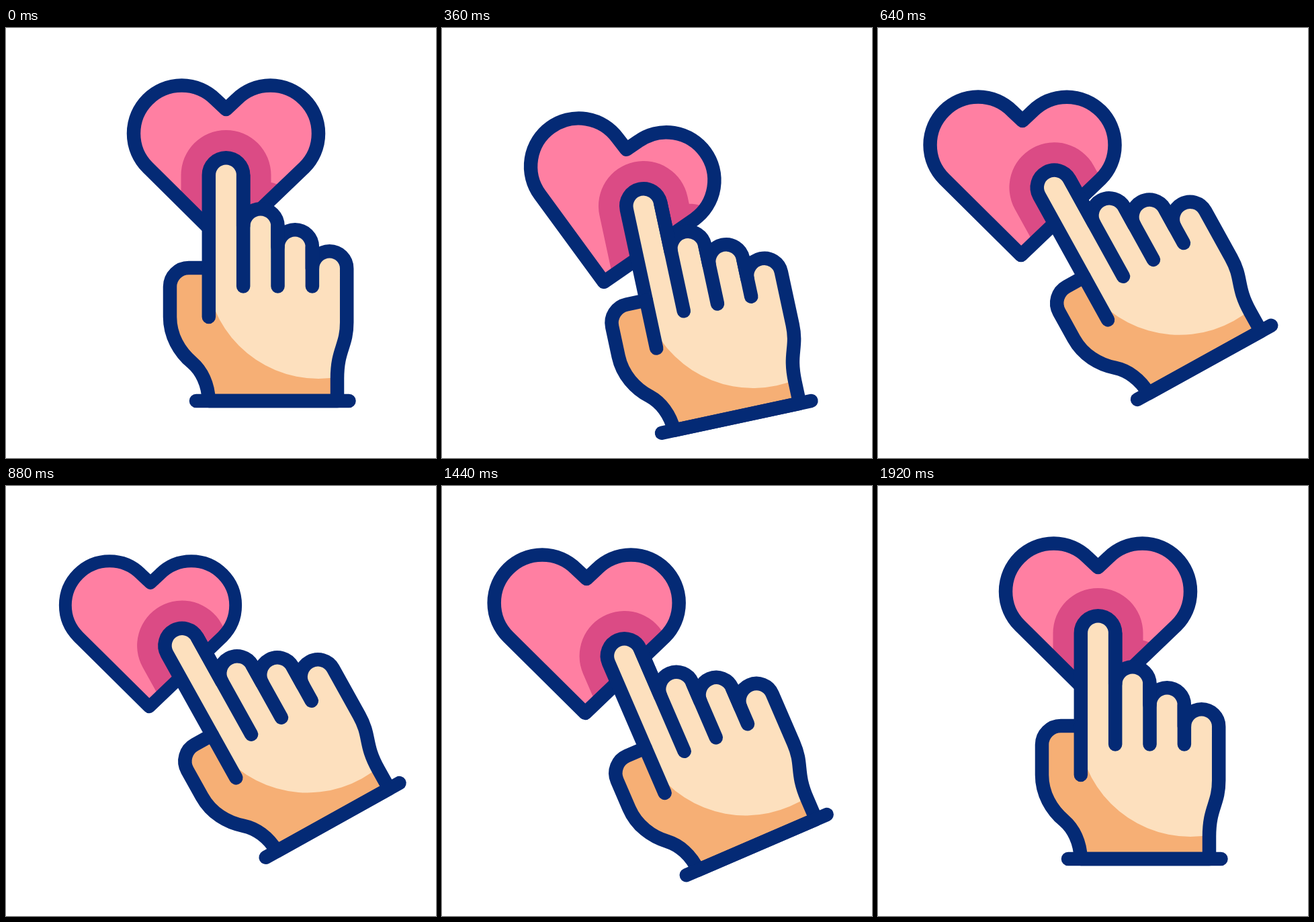
Recreate the animation shown at these times as an HTML page with a canvas. Size 640x640 px, loop 2000 ms.

```html
<!DOCTYPE html>
<html lang="en">
<head>
<meta charset="utf-8">
<title>Hand and heart</title>
<style>
  html, body { margin: 0; width: 100%; height: 100%; overflow: hidden; background: #fff; }
  canvas { display: block; width: 640px; height: 640px; }
</style>
</head>
<body>
<canvas id="stage"></canvas>
<script>
const LOOP = 2000, STEP = 40, LAST = 1920;
const NAVY = '#042a75', PINK = '#ff7fa2', ROSE = '#db4b85';
const SKIN = '#fde0be', SHADE = '#f6af75';
const LINE = 20.5, SHADOW = 134;
const TAU = Math.PI * 2, DEG = TAU / 360;

// Hand layout: evenly spaced fingers, index first
const GAP = 51.35, FIRST = 327.5, TIPS = [219, 295, 326, 358];
const PALM = 384.5, BASE = 555;
const fingerX = i => FIRST + i * GAP;
const creaseX = i => fingerX(i) - GAP / 2;

const canvas = document.getElementById('stage');
const ctx = canvas.getContext('2d');
const dpr = window.devicePixelRatio || 1;
canvas.width = canvas.height = 640 * dpr;

// Smooth rise from 0 to 1 between times a and b
function ramp(t, a, b) {
  const u = Math.min(1, Math.max(0, (t - a) / (b - a)));
  return u * u * (3 - 2 * u);
}

// Rise from a to b, fall from b to c
const bump = (t, a, b, c) => ramp(t, a, b) - ramp(t, b, c);

// Both parts sink and swing on the way left, then return
function handPose(t) {
  const tilt = ramp(t, 117, 664) - ramp(t, 1264, 1880);
  const lift = ramp(t, 315, 650) - ramp(t, 1310, 1590);
  return {
    x: 377 + 4 * bump(t, 0, 360, 720) + 4 * ramp(t, 360, 720)
      - 2.4 * bump(t, 1264, 1440, 1640) - 4 * ramp(t, 1640, LAST),
    y: 374.5 + 35 * (ramp(t, 0, 315) - ramp(t, 1590, LAST)) - 60.2 * lift,
    turn: -29.1 * tilt,
    size: 1
  };
}

function heartPose(t) {
  const back = ramp(t, 1430, 1890);
  return {
    x: 327.5 - 112.5 * (ramp(t, 0, 645) - back),
    y: 203 + 60.5 * ramp(t, 0, 320) - 43.5 * ramp(t, 320, 650) - 17 * back,
    turn: 9.3 * bump(t, 0, 330, 650) - 9.1 * bump(t, 1440, 1665, LAST),
    size: 1 - 0.08 * bump(t, 640, 900, 1180)
  };
}

function makeHeart() {
  const p = new Path2D(), q = TAU / 8;
  p.moveTo(-2, 118);
  p.arc(-66, -46, 71.5, 3 * q, 7 * q);
  p.lineTo(0, -82);
  p.arc(66, -46, 71.5, 5 * q, 9 * q);
  p.closePath();
  return p;
}

function makeHand() {
  const p = new Path2D(), left = creaseX(0), right = creaseX(4);
  p.moveTo(left, 357);
  p.arcTo(244, 357, 244, 385, 28);
  p.lineTo(244, 430);
  p.bezierCurveTo(244, 458, 258, 482, 277, 498);
  p.bezierCurveTo(291, 510, 301, 530, left, BASE);
  p.lineTo(493, BASE);
  p.lineTo(493, 522);
  p.bezierCurveTo(493, 478, right, 474, right, 438);
  for (let i = 3; i >= 0; i--) p.arc(fingerX(i), TIPS[i], GAP / 2, 0, Math.PI, true);
  p.closePath();
  return p;
}

function makeLines() {
  const p = new Path2D();
  const line = (x0, y0, x1, y1) => { p.moveTo(x0, y0); p.lineTo(x1, y1); };
  line(creaseX(0), 357, creaseX(0), 430);
  for (let i = 1; i < 4; i++) line(creaseX(i), TIPS[i - 1], creaseX(i), PALM);
  line(283, BASE, 510.5, BASE);
  return p;
}

function makeShadow() {
  const p = new Path2D();
  for (let i = 0; i < 2; i++) {
    p.moveTo(fingerX(i), TIPS[i]);
    p.lineTo(fingerX(i), 400);
  }
  return p;
}

const heart = makeHeart(), hand = makeHand();
const lines = makeLines(), shadow = makeShadow();

function place({ x, y, turn, size }) {
  ctx.setTransform(dpr, 0, 0, dpr, 0, 0);
  ctx.translate(x, y);
  ctx.rotate(turn * DEG);
  ctx.scale(size, size);
}

function placeHand(t) {
  place(handPose(t));
  ctx.translate(-377, -374.5);
}

function fill(path, color) {
  ctx.fillStyle = color;
  ctx.fill(path);
}

function stroke(path, color, width) {
  ctx.strokeStyle = color;
  ctx.lineWidth = width;
  ctx.stroke(path);
}

function drawHeart(t) {
  ctx.save();
  place(heartPose(t));
  fill(heart, PINK);
  ctx.clip(heart);
  placeHand(t);
  stroke(shadow, ROSE, SHADOW);
  ctx.restore();
  place(heartPose(t));
  stroke(heart, NAVY, LINE);
}

function drawHand(t) {
  placeHand(t);
  ctx.save();
  fill(hand, SHADE);
  ctx.clip(hand);
  const light = new Path2D();
  light.rect(creaseX(0), 180, 220, 176);
  light.arc(465, 355, 167, 0, TAU);
  fill(light, SKIN);
  ctx.restore();
  stroke(hand, NAVY, LINE);
  stroke(lines, NAVY, LINE);
}

function draw(now) {
  const t = Math.min(LAST, Math.floor((now % LOOP) / STEP) * STEP);
  ctx.setTransform(dpr, 0, 0, dpr, 0, 0);
  ctx.fillStyle = '#fff';
  ctx.fillRect(0, 0, 640, 640);
  ctx.lineCap = ctx.lineJoin = 'round';
  drawHeart(t);
  drawHand(t);
}

let start = null;
function tick(now) {
  if (start === null) start = now;
  draw(now - start);
  requestAnimationFrame(tick);
}
draw(0);
requestAnimationFrame(tick);
</script>
</body>
</html>
```
